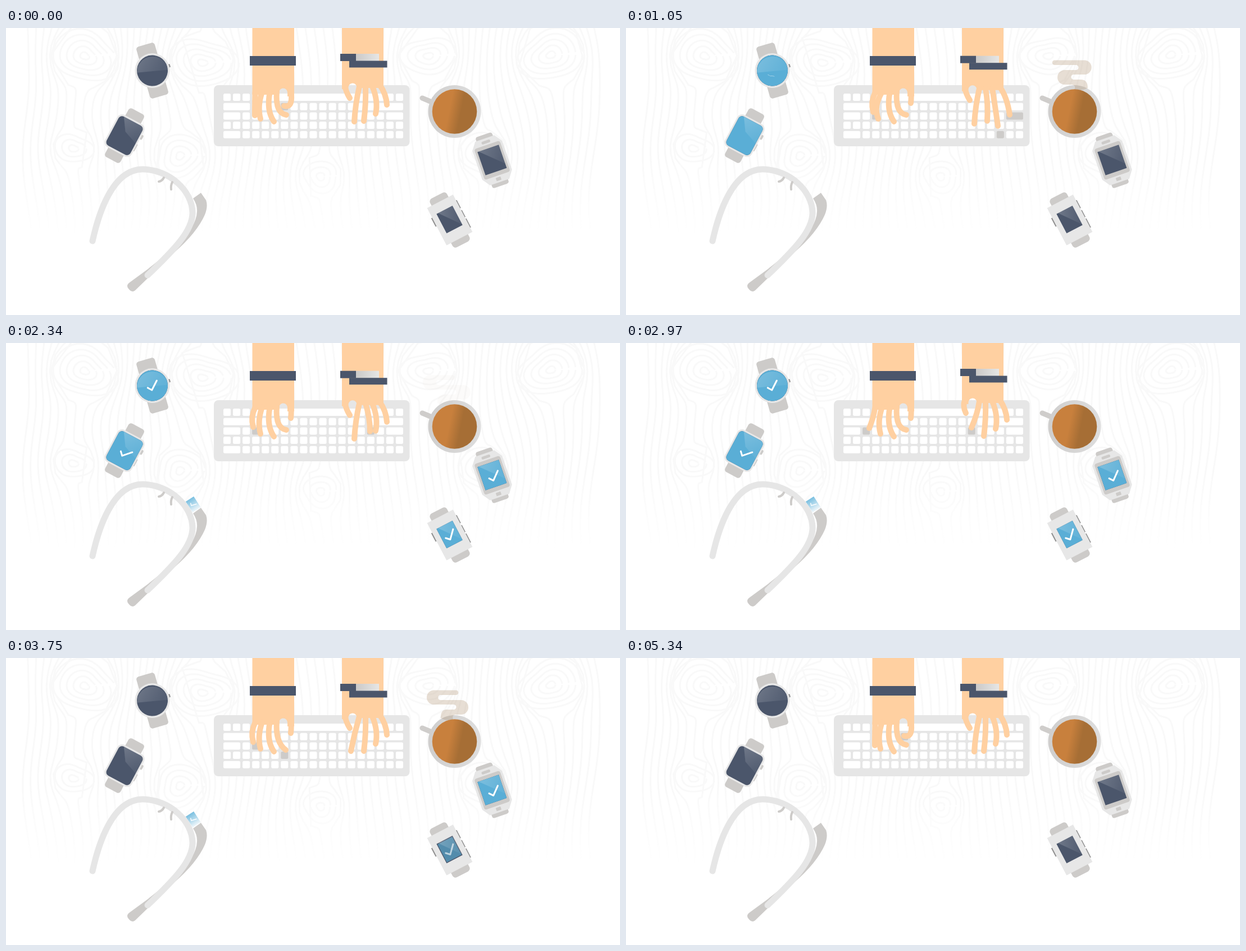
Write an HTML page that moves like this. It is 1093 px wide and 512 px high and loops after 5370 ms.

```html
<!DOCTYPE html>
<html lang="en">
<head>
<meta charset="utf-8">
<title>Desk with wearables</title>
<style>
  html, body { margin: 0; width: 100%; height: 100%; overflow: hidden; background: #fff; }
  svg { display: block; width: 100vw; height: 100vh; }
  .strap { fill: #cdcbc9; }
  .body { fill: #e7e7e7; }
  .off { fill: #4b566b; }
  .on { fill: #5aaed6; }
  .button { fill: #8f8f8f; }
  .tick { fill: none; stroke: #fff; stroke-width: 3; stroke-linecap: round; stroke-linejoin: round; }
  .skin { fill: #ffd0a1; }
  .finger { fill: none; stroke: #ffd0a1; stroke-width: 10; stroke-linecap: round; }
</style>
</head>
<body>
<svg viewBox="0 0 1093 512">
  <defs>
    <linearGradient id="glare" x1="0" y1="0" x2="1" y2=".6">
      <stop offset="0" stop-color="#fff" stop-opacity=".2"/>
      <stop offset="1" stop-color="#fff" stop-opacity=".06"/>
    </linearGradient>
    <linearGradient id="coffee" x1="0" y1=".4" x2="1" y2=".6">
      <stop offset=".38" stop-color="#c8803d"/>
      <stop offset=".64" stop-color="#a66e35"/>
    </linearGradient>
    <linearGradient id="rim" x1="0" y1="0" x2="1" y2="0">
      <stop offset="0" stop-color="#cfcecd"/>
      <stop offset="1" stop-color="#dedede"/>
    </linearGradient>
    <linearGradient id="silver">
      <stop offset="0" stop-color="#cac9c8"/>
      <stop offset="1" stop-color="#e6e6e5"/>
    </linearGradient>
    <linearGradient id="prism" x1="0" y1="0" x2="0" y2="1">
      <stop offset="0" stop-color="#79bfe0"/>
      <stop offset="1" stop-color="#eef6fa"/>
    </linearGradient>
    <linearGradient id="fade" x1="0" y1="0" x2="0" y2="1">
      <stop offset=".45" stop-color="#fff"/>
      <stop offset=".72" stop-color="#000"/>
    </linearGradient>
    <mask id="woodMask" maskUnits="userSpaceOnUse" x="0" y="0" width="1093" height="512">
      <rect width="1093" height="512" fill="url(#fade)"/>
    </mask>
  </defs>

  <g mask="url(#woodMask)"><path id="wood" fill="none" stroke="#f9f9f9" stroke-width="3"/></g>

  <!-- round watch -->
  <g transform="translate(260.5 76) rotate(-16)">
    <rect class="strap" x="-17" y="-48" width="34" height="96" rx="5"/>
    <rect class="button" x="30" y="-3" width="3" height="6" rx="1"/>
    <circle class="body" r="31"/>
    <circle class="off" r="27.5"/>
    <circle class="on" r="27.5"/>
    <path d="M-27.2 -4A27.5 27.5 0 0 1 26.8 6Z" fill="url(#glare)"/>
    <path class="tick"/>
  </g>

  <!-- rounded square watch -->
  <g transform="translate(211 192) rotate(28)">
    <rect class="strap" x="-15.5" y="-49" width="31" height="98" rx="5"/>
    <rect class="strap" x="26" y="-16" width="4.5" height="9" rx="2"/>
    <rect class="strap" x="26" y="3" width="2.5" height="14" rx="1"/>
    <rect class="body" x="-27" y="-32.5" width="54" height="65" rx="10"/>
    <rect class="off" x="-24" y="-29.5" width="48" height="59" rx="7"/>
    <rect class="on" x="-24" y="-29.5" width="48" height="59" rx="7"/>
    <path d="M-17 -29.5H17Q24 -29.5 24 -22V3L-2 -7Z" fill="url(#glare)"/>
    <g transform="translate(3.6 2.6)"><path class="tick"/></g>
  </g>

  <!-- tapered watch -->
  <g transform="translate(865.5 236) rotate(-19)">
    <rect class="strap" x="-15.5" y="-48" width="31" height="96" rx="4"/>
    <path class="body" d="M-18 -41H18L28 -27V27L18 41H-18L-28 27V-27Z"/>
    <rect class="strap" x="-24" y="-29" width="48" height="58" rx="4"/>
    <rect class="strap" x="-8" y="-37" width="16" height="5" rx="2"/>
    <rect class="strap" x="-4.5" y="32" width="9" height="6" rx="1"/>
    <rect class="off" x="-20" y="-22.5" width="40" height="44"/>
    <rect class="on" x="-20" y="-22.5" width="40" height="44"/>
    <path d="M-18 -22.5H20V13Z" fill="url(#glare)"/>
    <g transform="translate(2 2)"><path class="tick"/></g>
  </g>

  <!-- rectangular watch -->
  <g transform="translate(790 342.5) rotate(-27.5)">
    <rect class="strap" x="-17" y="-49" width="34" height="98" rx="6"/>
    <g class="button">
      <rect x="25" y="-26" width="2.5" height="16"/>
      <rect x="25" y="-6" width="2.5" height="14"/>
      <rect x="25" y="11" width="2.5" height="18"/>
      <rect x="-28" y="-18" width="2.5" height="17"/>
    </g>
    <rect class="body" x="-26" y="-37.5" width="52" height="75"/>
    <rect class="off" x="-16" y="-20.5" width="32" height="39"/>
    <rect class="on" x="-16" y="-20.5" width="32" height="39"/>
    <path d="M-13 -20.5H16V17Z" fill="url(#glare)"/>
    <path class="tick"/>
  </g>

  <!-- smart glasses -->
  <g transform="translate(333 287.5) rotate(-33)">
    <rect class="on" x="-8.5" y="-11" width="17" height="23" style="fill:url(#prism)"/>
    <g transform="rotate(63) scale(.5)"><path class="tick"/></g>
  </g>
  <path class="strap" d="M347 294L356 307Q360 318 354 333Q340 365 300 400L230 468Q224 473 218 465Q213 459 220 454L250 432C290 400 338 365 340 328Q341 316 333 304Z"/>
  <path d="M154 380C165 330 190 252 243 252C290 252 332 290 332 330C332 362 300 395 252 441" fill="none" stroke="#e6e6e6" stroke-width="11" stroke-linecap="round"/>
  <path d="M281 267Q278 273 272 274M296 275Q293 281 294 288" fill="none" stroke="#cdcbc9" stroke-width="4" stroke-linecap="round"/>

  <!-- coffee -->
  <path d="M741 125L760 133" stroke="#cfcdcb" stroke-width="9" stroke-linecap="round"/>
  <circle cx="798.5" cy="149" r="47" fill="url(#rim)"/>
  <circle cx="798.5" cy="149" r="39.8" fill="url(#coffee)"/>
  <path id="steam" fill="#a98a66"/>

  <!-- keyboard -->
  <rect x="370" y="102" width="348.500" height="109" rx="8" fill="#e6e6e6"/>
  <g id="keys"></g>

  <g id="left">
    <path class="skin" d="M438.500 0H513V122H501V115A7.500 7.500 0 0 0 486 115V119H438.500Z"/>
    <rect class="off" x="434" y="50" width="82" height="17"/>
  </g>
  <path class="skin" d="M598 0H672V60H598Z"/>
  <g id="right">
    <path class="skin" d="M598 40H672V107H624.500V106A7.500 7.500 0 0 0 609.500 106V109H598Z"/>
    <rect class="off" x="595" y="46" width="28" height="13"/>
    <rect x="623" y="46" width="41" height="13" fill="url(#silver)"/>
    <rect class="off" x="611" y="58.5" width="67.500" height="12"/>
  </g>
</svg>

<script>
const LOOP = 5370;
const $ = id => document.getElementById(id);
const clamp = v => Math.min(1, Math.max(0, v));
const smooth = v => (v = clamp(v), v * v * (3 - 2 * v));
const ramp = (t, from, to) => smooth((t - from) / (to - from));
const mix = (a, b, k) => a + (b - a) * k;
const between = (t, a, b, edge = 80) => ramp(t, a - edge, a) * (1 - ramp(t, b, b + edge));
const pulse = (t, a, b) => Math.max(between(t, a, b), between(t + LOOP, a, b), between(t - LOOP, a, b));

function add(parent, name, attrs) {
  const el = document.createElementNS('http://www.w3.org/2000/svg', name);
  for (const key in attrs) el.setAttribute(key, attrs[key]);
  return parent.appendChild(el);
}

// Wood grain: rings inside each knot, vertical grain pushed around it.
const knots = [[140, 50, 62], [350, 62, 58], [752, 50, 55], [970, 48, 62], [310, 228, 48], [560, 265, 40], [850, 225, 45], [120, 215, 38]];
function drawWood() {
  let d = '';
  const line = points => { d += 'M' + points.map(p => p[0].toFixed(1) + ' ' + p[1].toFixed(1)).join('L'); };
  knots.forEach(([cx, cy, size], n) => {
    for (let r = 8; r < size; r += 12) {
      const ring = [];
      for (let a = 0; a <= 6.3; a += 0.15) {
        const q = r * (1 + 0.12 * Math.sin(2 * a + n) + 0.07 * Math.sin(3 * a + n * 2));
        ring.push([cx + q * Math.cos(a), cy + q * 0.8 * Math.sin(a)]);
      }
      line(ring);
    }
  });
  for (let x0 = 40; x0 < 1060; x0 += 15) {
    const grain = [];
    for (let y0 = -20; y0 <= 370; y0 += 10) {
      let x = x0 + 8 * Math.sin(y0 / 55 + x0 / 90), y = y0;
      for (const [cx, cy, size] of knots) {
        const dx = x - cx, dy = y - cy, dist = Math.hypot(dx, dy) || 1;
        const push = Math.sqrt(dist * dist + size * size * Math.exp(-dist / size / 1.5)) / dist;
        x = cx + dx * push;
        y = cy + dy * push;
      }
      grain.push([x, y]);
    }
    line(grain);
  }
  $('wood').setAttribute('d', d);
}

// Each row lists key widths in columns.
const ones = n => Array(n).fill(1);
const rows = [[...ones(4), 11, ...ones(4)], [3, ...ones(13), 3], [2, ...ones(15), 2], ones(19), [2, ...ones(17)]];
const keys = {};
rows.forEach((row, r) => {
  let col = 0;
  for (const span of row) {
    keys[r + ':' + col] = add($('keys'), 'rect', {
      x: 387 + col * 17.05, y: 117 + r * 16.7, width: span * 17.05 - 4, height: 13, rx: 2.5
    });
    col += span;
  }
});

// base x, y, control x, y, tip x, y
const fingers = {
  lp: ['left', 443.5, 115, 443, 138, 443, 156],
  lr: ['left', 456, 114, 447, 140, 453, 162],
  lm: ['left', 470, 113, 463, 147, 477, 167],
  li: ['left', 482, 113, 479, 152, 499, 155],
  lt: ['left', 507.5, 115, 508, 126, 507, 134],
  rt: ['right', 603, 102, 605, 114, 612, 125],
  ri: ['right', 629, 104, 622, 135, 620, 167],
  rm: ['right', 640, 104, 641, 135, 637, 166],
  rr: ['right', 652, 104, 663, 130, 658, 153],
  rp: ['right', 665, 101, 677, 118, 678, 137]
};
for (const f of Object.values(fingers)) f.el = add($(f[0]), 'path', { class: 'finger' });

// finger, press start, press end, control x, y, tip x, y, key
const presses = [
  ['lt', 5180, 5520, 511, 143, 495, 139, '1:6'],
  ['lt', 4480, 4760, 511, 143, 495, 139, '1:6'],
  ['lp', 480, 640, 435, 132, 440, 150, '2:3'],
  ['lp', 940, 1130, 435, 132, 440, 150, '2:3'],
  ['lp', 1680, 1800, 435, 132, 440, 150, '2:3'],
  ['lp', 2220, 2480, 435, 132, 440, 150, '2:3'],
  ['lp', 2860, 3080, 440, 135, 433, 152, '2:2'],
  ['lp', 3640, 3840, 435, 132, 440, 150, '2:3'],
  ['lr', 960, 1130, 440, 140, 449, 162, ''],
  ['lr', 4540, 4720, 449, 143, 456, 167, ''],
  ['li', 3660, 3840, 479, 150, 498, 164, '3:6'],
  ['ri', 420, 560, 622, 132, 615, 152, '2:13'],
  ['ri', 2880, 3080, 626, 126, 615, 151, '2:13'],
  ['rt', 2860, 3080, 599, 113, 605, 125, ''],
  ['ri', 3600, 4800, 620, 135, 614, 166, ''],
  ['rm', 960, 1130, 645, 132, 643, 162, ''],
  ['rm', 2240, 2460, 648, 130, 648, 154, '2:15'],
  ['rr', 960, 1130, 657, 135, 662, 171, '4:16'],
  ['rp', 970, 1130, 678, 118, 683, 151, '2:17']
];
const bobs = [[920, 1160], [2200, 2480], [3360, 3520], [4780, 4870], [5020, 5150]];

function drawHands(t) {
  for (const key of Object.values(keys)) key.style.fill = '#fff';
  for (const id in fingers) {
    const f = fingers[id];
    const pose = f.slice(1);
    for (const [finger, start, end, ...target] of presses) {
      if (finger !== id) continue;
      const k = pulse(t, start, end), key = keys[target[4]];
      for (let i = 0; i < 4; i++) pose[i + 2] += (target[i] - f[i + 3]) * k;
      if (key && k > 0.6) key.style.fill = '#cdcbc9';
    }
    const [x, y, cx, cy, tx, ty] = pose.map(v => v.toFixed(2));
    f.el.setAttribute('d', `M${x} ${y}Q${cx} ${cy} ${tx} ${ty}`);
  }
  const drop = 3.7 * Math.max(...bobs.map(([a, b]) => pulse(t, a, b)));
  $('right').setAttribute('transform', `translate(0 ${drop})`);
}

// screen on, tick in, screen off
const timing = [[380, 1030, 3180], [460, 1180, 3330], [1250, 1560, 3900], [1030, 1450, 3610], [1420, 1700, 3860]];
const ticks = [...document.querySelectorAll('.tick')];
const screens = [...document.querySelectorAll('.on')];
ticks.forEach(tick => tick.setAttribute('d', 'M-9 1.5L-3 7.5L10 -6.5'));

function drawScreens(t) {
  timing.forEach(([on, check, off], i) => {
    const closing = ramp(t, off, off + 330);
    const open = ramp(t, on, on + 300);
    const show = open * (1 - closing);
    const size = open * (1 - 0.2 * closing);
    screens[i].setAttribute('transform', `scale(${size})`);
    screens[i].style.opacity = show;
    const k = ramp(t, check, check + 260);
    ticks[i].setAttribute('transform',
      `translate(${-5 * (1 - k)} ${8 * (1 - k)}) rotate(${36 * (1 - k)}) scale(${mix(0.6, 1, k)} ${mix(0.1, 1, k)})`);
    ticks[i].style.opacity = ramp(t, check - 30, check + 50) * (1 - closing);
  });
}

// The plume sways from right (-1) to left (1).
function drawSteam(t) {
  const second = t > 3000;
  const k = second ? mix(0.82, 1, ramp(t, 3750, 4620)) : mix(-1, 1.05, ramp(t, 1050, 2200));
  const at = (centre, reach) => (797 + centre + reach * k).toFixed(1);
  const top = second ? mix(801, 794, ramp(t, 3750, 4620)) : at(-18.5, 15.5);
  const sweep = k > 0 ? 0 : 1, back = 1 - sweep;
  const arc = (r, x, y, dir) => `A${r} ${r} 0 0 ${dir} ${x} ${y}`;
  const a = at(-11, -31), b = at(0, 16), c = at(-1.5, -14);
  const slotA = at(-11, -15), slotB = at(0, 0);
  $('steam').setAttribute('d',
    `M${top} 57.5H${a}` + arc(12.8, a, 83, sweep) +
    `H${slotB}` + arc(4.5, slotB, 92, back) +
    `H${c}Q${at(-1.5, -26.5)} 92 ${at(-1.5, -26.5)} 107Q${at(-1.5, -15)} 113 ${at(0, -1)} 110` +
    `Q${at(0, -5)} 102 ${at(0, 4)} 101H${b}` + arc(13, b, 75, sweep) +
    `H${slotA}` + arc(4.5, slotA, 66, back) +
    `H${top}` + arc(4.25, top, 57.5, sweep) + 'Z');
  const strength = second
    ? ramp(t, 3200, 3650) * (1 - ramp(t, 4700, 5250))
    : ramp(t, 250, 900) * (1 - ramp(t, 1750, 2500));
  $('steam').style.opacity = 0.28 * strength;
}

function frame() {
  const t = performance.now() % LOOP;
  drawHands(t);
  drawScreens(t);
  drawSteam(t);
  requestAnimationFrame(frame);
}

drawWood();
frame();
</script>
</body>
</html>
```
